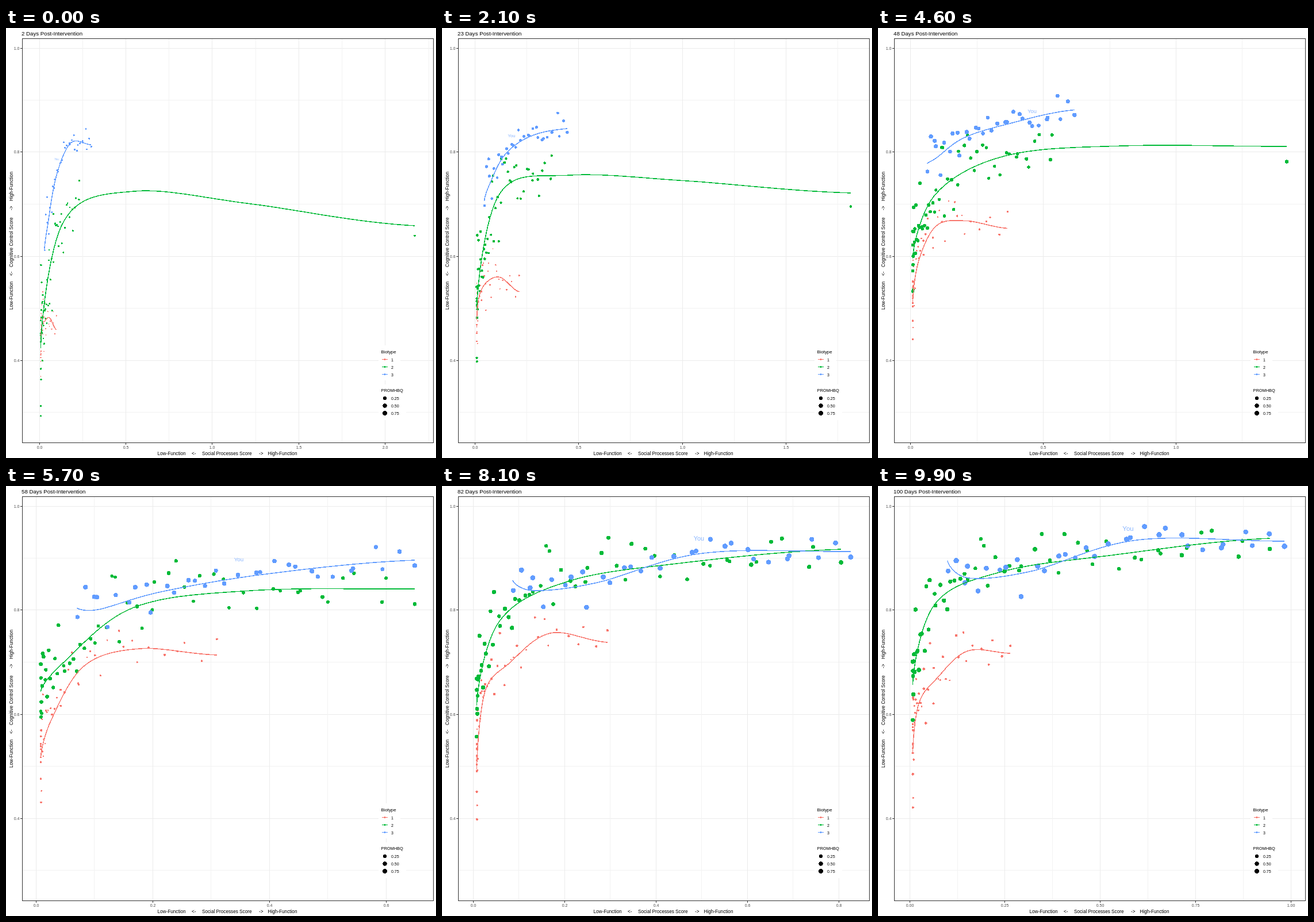
These frames come from a looping animation (748x748 px, 10 s). An HTML page:

```html
<!DOCTYPE html>
<html lang="en">
<head>
<meta charset="utf-8">
<title>Post-intervention scores</title>
<style>
html, body { margin: 0; width: 100%; height: 100%; overflow: hidden; background: #fff; }
svg { display: block; width: 100vw; height: 100vh; shape-rendering: crispEdges; }
text { font-family: "Liberation Sans", Arial, sans-serif; font-size: 8.2px; }
.tick text { font-size: 7px; fill: #4d4d4d; }
.small { font-size: 7px; }
.major { stroke: #ebebeb; }
.minor { stroke: #f2f2f2; }
.mark { stroke: #333; }
.curve { fill: none; stroke-width: 1.5; stroke-linejoin: round; }
</style>
</head>
<body>
<svg viewBox="0 0 748 748">
  <clipPath id="panel"><rect x="28" y="18" width="716" height="704"/></clipPath>
  <text id="title" x="27" y="13" style="font-size:9.7px"></text>
  <g id="yAxis" class="tick"></g>
  <g id="xAxis" class="tick"></g>
  <g id="plot" clip-path="url(#panel)"></g>
  <g id="legend"></g>
  <rect x="28.5" y="18.5" width="715" height="703" fill="none" stroke="#333"/>
  <g id="captions"></g>
</svg>
<script>
const FRAME = 100, LAST = 99;
const KEYS = [0, 21, 35, 57, 67, 81, LAST];
const $ = id => document.getElementById(id);
const lerp = (a, b, t) => a + (b - a) * t;
const crisp = v => Math.floor(v) + .5;

// Piecewise linear value between KEYS.
function track(values, k) {
  let i = 0;
  while (i < KEYS.length - 2 && k > KEYS[i + 1]) i++;
  return lerp(values[i], values[i + 1], (k - KEYS[i]) / (KEYS[i + 1] - KEYS[i]));
}

function seeded(seed) {
  return () => {
    seed = seed + 0x6d2b79f5 | 0;
    let t = Math.imul(seed ^ seed >>> 15, seed | 1);
    t ^= t + Math.imul(t ^ t >>> 7, t | 61);
    return ((t ^ t >>> 14) >>> 0) / 2 ** 32;
  };
}

// The horizontal view always spans from NEAR to the farthest value.
const NEAR = .008, VIEW_LEFT = 60.5, VIEW_RIGHT = 711;
const far = k => track([2.17, 1.813, 2.185, .649, .653, .826, .989], k);
const scaleAt = k => (VIEW_RIGHT - VIEW_LEFT) / (far(k) - NEAR);
const toPx = (x, k) => VIEW_LEFT + (x - NEAR) * scaleAt(k);
const toY = v => 35 + (1 - v) * 905;

// Heights of each curve stand at (i/4)^2 of its width, one row per key.
const groups = [
  {
    color: "#f8766d", count: 50, skew: 4, spread: [48, 68], radius: [.9, 1.85], wobble: .3, seed: 5,
    left: () => NEAR,
    right: k => track([.098, .213, .42, .31, .251, .294, .264], k),
    heights: [
      [556, 517, 510, 504, 525],
      [508, 465, 441, 434, 459],
      [480, 405, 376, 388, 403],
      [473, 405, 312, 283, 294],
      [460, 382, 313, 256, 254],
      [493, 358, 308, 256, 272],
      [463, 378, 334, 287, 291]]
  },
  {
    color: "#00ba38", count: 58, skew: 2.5, spread: [62, 42], radius: [1.6, 3.5], wobble: .1, seed: 21,
    left: () => NEAR,
    right: k => far(k) * (1 - .045 * Math.max(0, (k - 57) / 42)),
    reach: k => .25 + .0071 * k,
    heights: [
      [557, 335, 284, 306, 344],
      [490, 287, 256, 266, 287],
      [445, 270, 233, 228, 233],
      [358, 306, 211, 182, 179],
      [363, 269, 188, 157, 138],
      [382, 235, 166, 134, 110],
      [346, 205, 149, 120, 91]]
  },
  {
    color: "#619cff", count: 32, skew: 1.2, spread: [24, 20], radius: [1.5, 4.4], wobble: .08, seed: 8,
    left: k => .03 + .0007 * k,
    right: k => Math.min(far(k), .3 + .0069 * k),
    heights: [
      [384, 345, 258, 200, 203],
      [301, 272, 220, 188, 175],
      [260, 237, 198, 179, 156],
      [212, 215, 184, 153, 129],
      [187, 204, 179, 138, 126],
      [164, 182, 168, 117, 114],
      [130, 160, 148, 94, 96]]
  }
];

function curveAt(group, k) {
  const ys = group.heights[0].map((_, j) => track(group.heights.map(row => row[j]), k));
  return { left: group.left(k), right: group.right(k), ys };
}

// Catmull-Rom through the heights; v runs from 0 to 4.
function heightAt(ys, v) {
  const i = Math.min(3, Math.floor(v)), t = v - i;
  const b = ys[i], c = ys[i + 1], a = ys[Math.max(0, i - 1)], d = ys[Math.min(4, i + 2)];
  return b + t / 2 * (c - a + t * (2 * a - 5 * b + 4 * c - d + t * (3 * (b - c) + d - a)));
}

function make(tag, parent, attrs) {
  const el = document.createElementNS("http://www.w3.org/2000/svg", tag);
  for (const name in attrs) el.setAttribute(name, attrs[name]);
  return parent.appendChild(el);
}

const line = (x1, y1, x2, y2, cls) => `<line class="${cls}" x1="${x1}" y1="${y1}" x2="${x2}" y2="${y2}"/>`;
const label = (x, y, s, more = "") => `<text x="${x}" y="${y}" ${more}>${s}</text>`;

function drawYAxis() {
  let out = "";
  for (let i = 3; i <= 10; i++) {
    const y = crisp(toY(i / 10));
    out += line(28, y, 743, y, i % 2 ? "minor" : "major");
    if (i % 2 === 0) {
      out += line(25, y, 28, y, "mark") + label(23.5, y + 2.5, (i / 10).toFixed(1), 'text-anchor="end"');
    }
  }
  $("yAxis").innerHTML = out;
}

function drawXAxis(k) {
  const end = far(k), step = end > 1.2 ? .5 : end > .9 ? .25 : .2;
  let out = "";
  for (let i = 0; toPx(i * step / 2, k) < 743; i++) {
    const v = i * step / 2, x = crisp(toPx(v, k));
    out += line(x, 18, x, 722, i % 2 ? "minor" : "major");
    if (i % 2 === 0) {
      out += line(x, 722, x, 725, "mark") +
        label(x, 732, v.toFixed(step === .25 ? 2 : 1), 'text-anchor="middle"');
    }
  }
  $("xAxis").innerHTML = out;
}

function drawLegend() {
  let out = '<rect x="648" y="552" width="38" height="61" fill="#fff"/>' +
    '<rect x="648" y="620" width="48" height="62" fill="#fff"/>' +
    label(652.5, 565.5, "Biotype", 'style="font-size:7.8px"') +
    label(652.5, 633, "PROMHBQ", 'style="font-size:7.4px"');
  groups.forEach((g, i) => {
    const y = 576.5 + i * 13, dotY = 644 + i * 13;
    out += `<path d="M654 ${y}h10" stroke="${g.color}" stroke-width="1.5"/>` +
      `<circle cx="659" cy="${y}" r="1.5" fill="${g.color}"/>` +
      label(670, y + 3, i + 1, 'class="small"') +
      `<circle cx="659" cy="${dotY}" r="${2.9 + i * .7}"/>` +
      label(670, dotY + 3, (.25 * (i + 1)).toFixed(2), 'class="small"');
  });
  $("legend").innerHTML = out;
}

function drawCaptions() {
  const caption = (name, spots, transform) => {
    const words = ["Low-Function", "&lt;-", name, "-&gt;", "High-Function"];
    return `<g transform="${transform}">${words.map((w, i) => label(spots[i], 0, w)).join("")}</g>`;
  };
  $("captions").innerHTML =
    caption("Social Processes Score", [263.5, 323, 341, 440, 455.5], "translate(0 743)") +
    caption("Cognitive Control Score", [258, 317, 332, 431, 447], "translate(11.5 748) rotate(-90)");
}

// Every point has a rank along x and two normal draws that it drifts between.
function scatter(g) {
  const random = seeded(g.seed);
  const normal = () => 2 * (random() + random() + random() - 1.5);
  return Array.from({ length: g.count }, (_, i) => ({
    rank: i === g.count - 1 ? 1 : (i + random()) / g.count,
    early: normal(),
    late: normal(),
    size: 1 + g.wobble * (2 * random() - 1),
    dot: make("circle", $("plot"), { fill: g.color })
  }));
}

function drawGroup(g, k) {
  const { left, right, ys } = curveAt(g, k);
  const reach = g.reach ? Math.min(right, g.reach(k)) : right;
  const grown = Math.sin(Math.PI / 2 * k / LAST), turn = k / 63;
  const radius = lerp(...g.radius, grown), spread = lerp(...g.spread, k / LAST);
  for (const p of g.points) {
    const x = lerp(left, p.rank === 1 ? right : reach, p.rank ** g.skew);
    const offset = p.early * Math.cos(turn) + p.late * Math.sin(turn);
    const v = 4 * Math.sqrt((x - left) / (right - left));
    p.dot.setAttribute("cx", toPx(x, k));
    p.dot.setAttribute("cy", heightAt(ys, v) + offset * spread * (1 - .6 * p.rank));
    p.dot.setAttribute("r", radius * p.size);
  }
  const path = [];
  for (let v = 0; v <= 4; v += 1 / 16) {
    path.push(toPx(lerp(left, right, v * v / 16), k).toFixed(1) + " " + heightAt(ys, v).toFixed(1));
  }
  g.path.setAttribute("d", "M" + path.join("L"));
}

const you = make("text", $("plot"), { fill: "#619cff", "fill-opacity": .75, "text-anchor": "middle" });
you.textContent = "You";

function drawYou(k) {
  const size = 4.5 + 7 * Math.sqrt(k / LAST);
  you.setAttribute("x", track([88, 121, 131, 405, 465, 447, 435], k));
  you.setAttribute("y", track([228, 187, 162, 127, 113, 91, 74], k) + size * .36);
  you.style.fontSize = size + "px";
}

function draw(k) {
  $("title").textContent = Math.round(2 + 98 * k / LAST) + " Days Post-Intervention";
  drawXAxis(k);
  for (const g of groups) drawGroup(g, k);
  drawYou(k);
}

for (const g of groups) g.points = scatter(g);
for (const g of groups) g.path = make("path", $("plot"), { class: "curve", stroke: g.color });
$("plot").append(you);
drawYAxis();
drawLegend();
drawCaptions();

const start = performance.now();
let shown = -1;
function tick() {
  const k = Math.floor((performance.now() - start) / FRAME) % (LAST + 1);
  if (k !== shown) draw(shown = k);
  requestAnimationFrame(tick);
}
tick();
</script>
</body>
</html>
```
